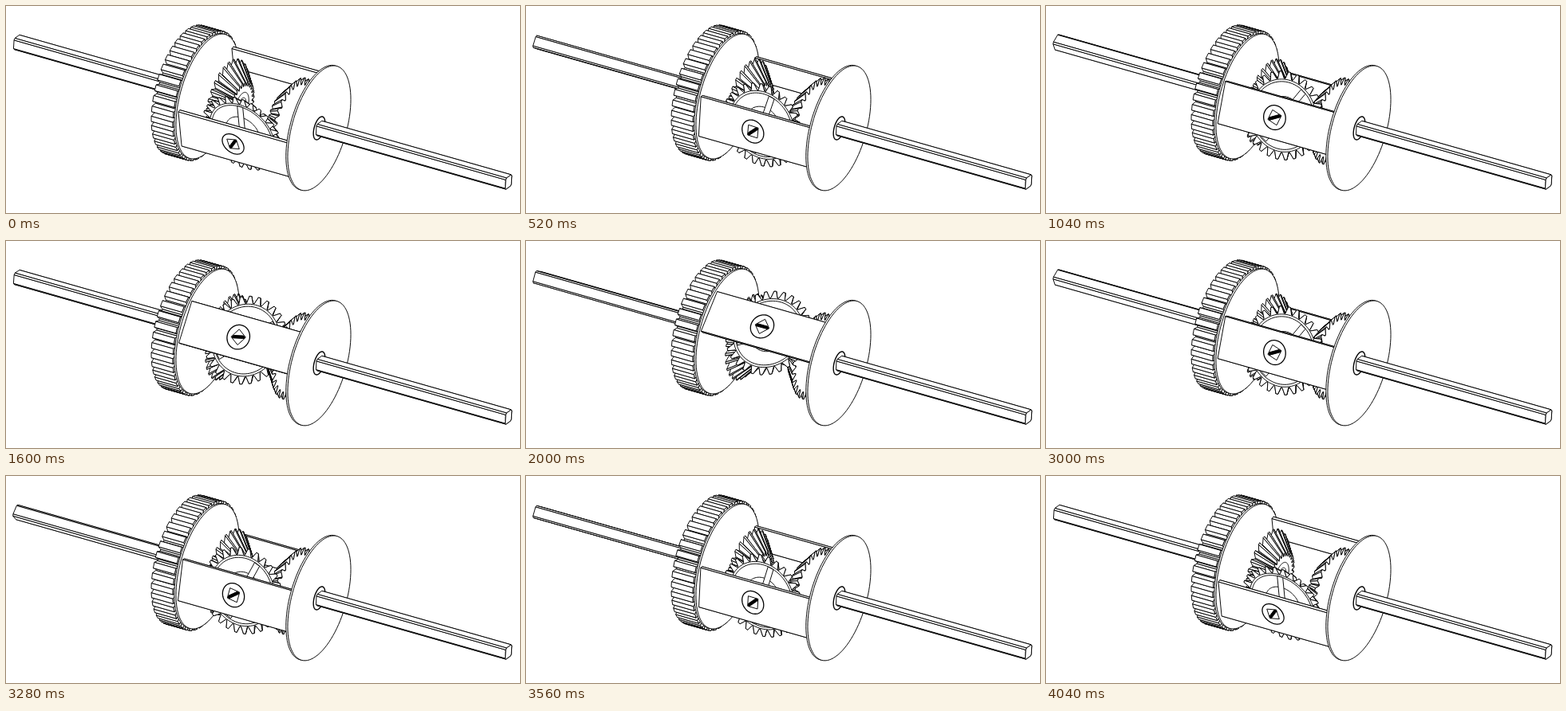
Write an HTML page with a canvas that moves like this. It is 644 by 260 pixels and loops after 4080 ms.

```html
<!DOCTYPE html>
<html lang="en">
<head>
<meta charset="utf-8">
<title>Differential gear</title>
<style>
  html, body { margin: 0; width: 100%; height: 100%; overflow: hidden; background: #fff; }
  canvas { display: block; width: 644px; height: 260px; }
</style>
</head>
<body>
<canvas id="stage" width="644" height="260"></canvas>
<script>
const ctx = document.getElementById('stage').getContext('2d');
const RAD = Math.PI / 180;
const STEP = 40, HALF = 51;
const PHI0 = 133, RATE = 1.15;         // carrier angle and degrees per step

// Orthographic view: x right, y down, z towards the viewer.
const O = [319, 132.5, 0];
const U = [0.8727, 0.2487, 0.42];      // main axle
const E1 = [0.274, -0.9616, 0];
const E2 = [-0.4039, -0.1151, 0.9075];

// O + a*A + b*B + c*C
const at = (a, A, b, B, c, C) => O.map((o, i) => o + a * A[i] + b * B[i] + c * C[i]);
const mix = (a, A, b, B) => A.map((v, i) => a * v + b * B[i]);
const depth = pts => pts.reduce((sum, p) => sum + p[2], 0) / pts.length;

function poly(pts, fill = '#fff', width = 0.95) {
  ctx.beginPath();
  pts.forEach(p => ctx.lineTo(p[0], p[1]));
  ctx.closePath();
  ctx.fillStyle = fill;
  ctx.fill();
  ctx.lineWidth = width;
  ctx.stroke();
}

function sorted(faces) {
  faces.sort((a, b) => depth(a) - depth(b)).forEach(f => poly(f));
}

function ring(d, r, A, P, Q) {
  const pts = [];
  for (let i = 0; i < 90; i++) {
    const w = i * 4 * RAD;
    pts.push(at(d, A, r * Math.cos(w), P, r * Math.sin(w), Q));
  }
  return pts;
}

// Side faces of a solid between two matching outlines.
function sides(a, b) {
  return a.map((p, i) => {
    const j = (i + 1) % a.length;
    return [p, a[j], b[j], b[i]];
  });
}

function gear(g, A, P, Q, phase) {
  const pitch = 2 * Math.PI / g.teeth;
  const outline = (d, scale) => {
    const pts = [];
    for (let i = 0; i < g.teeth; i++) {
      [[-g.foot, g.root], [-g.top, g.tip], [g.top, g.tip], [g.foot, g.root]].forEach(([o, r]) => {
        const w = phase + (i + o) * pitch;
        pts.push(at(d, A, r * scale * Math.cos(w), P, r * scale * Math.sin(w), Q));
      });
    }
    return pts;
  };
  const big = outline(g.outer, 1), small = outline(g.inner, g.taper);
  sorted(sides(big, small));
  poly(A[2] > 0 ? big : small);
}

function disc(front, back, r) {
  poly(ring(back, r, U, E1, E2));
  poly(ring(front, r, U, E1, E2));
}

function shaft(from, to, angle) {
  const end = s => {
    const pts = [];
    for (let i = 0; i < 4; i++) for (const o of [-8, 8]) {
      const w = (angle + i * 90 + o) * RAD;
      pts.push(at(s, U, 9.8 * Math.cos(w), E1, 9.8 * Math.sin(w), E2));
    }
    return pts;
  };
  const a = end(from), b = end(to);
  sorted(sides(a, b));
  poly(b);
}

const LEFT = -76.2, RIGHT = 84.2;
const ARM = 71.5;
function arm(N, T, lo, hi) {
  const end = s => [[ARM, lo], [ARM, hi], [ARM - 4, hi], [ARM - 4, lo]]
    .map(([d, w]) => at(s, U, d, N, w, T));
  sorted(sides(end(LEFT), end(RIGHT - 2.5)));
}

const RING = { teeth: 38, tip: 84, root: 75.5, top: 0.27, foot: 0.4, outer: -79, inner: -110, taper: 1 };
const BEVEL = { teeth: 28, tip: 56, root: 47, top: 0.12, foot: 0.42, outer: 48, inner: 27, taper: 0.56 };

function planet(N, T, spin) {
  gear(BEVEL, N, U, T, spin + Math.PI / BEVEL.teeth);
  poly(ring(48, 46, N, U, T));
  poly(ring(48, 43, N, U, T));
  poly(ring(46, 24, N, U, T));
  const w = spin - 90 * RAD;
  const along = mix(Math.cos(w), U, Math.sin(w), T);
  const across = mix(-Math.sin(w), U, Math.cos(w), T);
  poly([[-42, -4], [42, -4], [42, 4], [-42, 4]].map(([a, b]) => at(47, N, a, along, b, across)));
}

function pinHead(N, T, spin) {
  poly(ring(ARM, 15.5, N, U, T), '#fff', 1.3);
  const w = spin - 58 * RAD;
  const along = mix(Math.cos(w), U, Math.sin(w), T);
  const across = mix(-Math.sin(w), U, Math.cos(w), T);
  const shape = (pts, fill) => poly(pts.map(([a, b]) => at(ARM, N, a, along, b, across)), fill);
  shape([[-10, 0], [0, -10], [10, 0], [0, 10]], '#fff');
  shape([[-9, 0], [-7, -2], [7, -2], [9, 0], [8, 1.5], [-8, 1.5]], '#000');
}

function draw(k) {
  const turn = RATE * k;
  const phi = (PHI0 - turn) * RAD, spin = turn * RAD;
  const N = mix(Math.cos(phi), E1, Math.sin(phi), E2);
  const T = mix(-Math.sin(phi), E1, Math.cos(phi), E2);
  const flip = v => v.map(c => -c);

  ctx.fillStyle = '#fff';
  ctx.fillRect(0, 0, 644, 260);
  ctx.strokeStyle = '#000';
  ctx.lineJoin = 'round';

  shaft(-350, -100, 73 - 2 * turn);
  gear(RING, U, E1, E2, phi);
  disc(LEFT, LEFT - 2.5, 81);
  arm(flip(N), flip(T), -3, 27.5);

  // side gears: the left one runs at twice the carrier speed, the right one stands still
  gear(BEVEL, flip(U), E1, E2, (PHI0 - 2 * turn) * RAD);
  poly(ring(-27, 18, U, E1, E2));
  poly(ring(-27, 11, U, E1, E2));
  gear(BEVEL, U, E1, E2, PHI0 * RAD);

  planet(N, T, spin);
  arm(N, T, -27.5, 27.5);
  pinHead(N, T, spin);

  disc(RIGHT, RIGHT - 2.5, 81);
  poly(ring(RIGHT, 15, U, E1, E2), '#fff', 1.4);
  shaft(RIGHT, 356, 73);
}

const start = performance.now();
let shown = -1;
function tick() {
  const i = Math.floor((performance.now() - start) / STEP) % (2 * HALF);
  const k = i < HALF ? i : 2 * HALF - 1 - i;
  if (k !== shown) draw(shown = k);
  requestAnimationFrame(tick);
}
tick();
</script>
</body>
</html>
```
